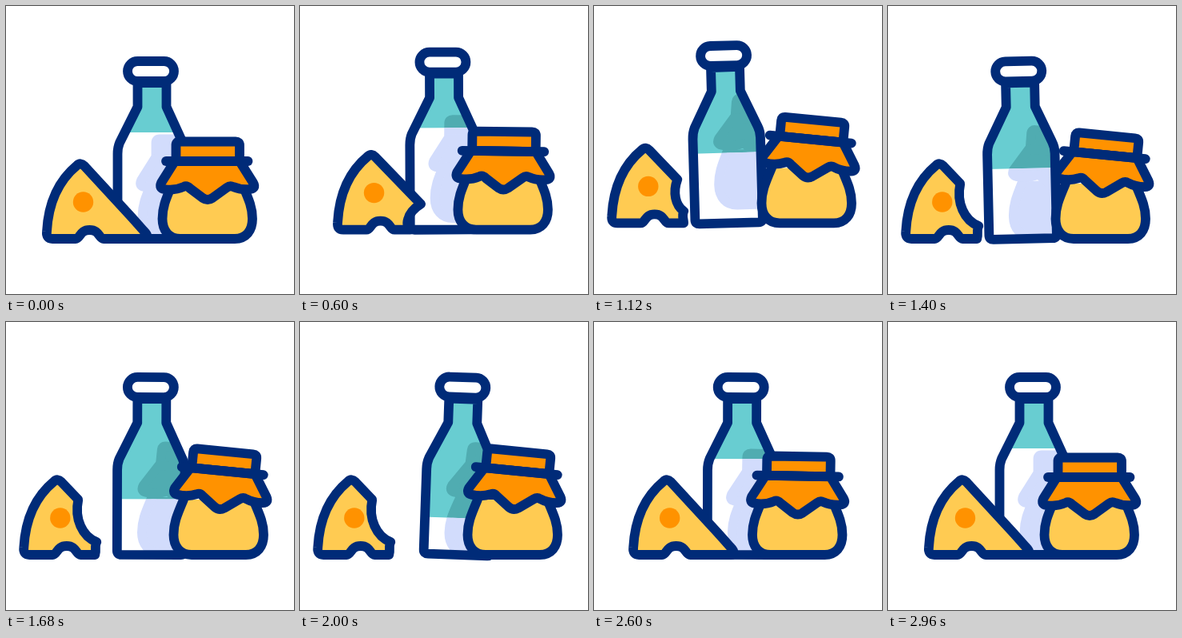
An HTML page with a canvas that plays this animation: 360 by 360 pixels, repeating every 3 s.

```html
<!DOCTYPE html>
<html lang="en">
<head>
<meta charset="utf-8">
<title>Milk, cheese and honey</title>
<style>
  html, body { margin: 0; width: 100%; height: 100%; overflow: hidden; background: #fff; }
  canvas { display: block; width: 360px; height: 360px; }
</style>
</head>
<body>
<canvas id="stage" width="360" height="360"></canvas>
<script>
const ctx = document.getElementById('stage').getContext('2d');
const LOOP = 3000, STEP = 40;
const INK = '#002b78', YELLOW = '#ffcb52', ORANGE = '#ff9200';
const TEAL = '#68cdd1', TEAL_SHADE = '#50acb1', MILK_SHADE = '#d2dcfc';

const bottle = new Path2D('M164.500 96V126L142 171Q139.500 177 139.500 185V286Q139.500 291 145 291H219Q224 291 224 286V185Q224 177 221 171L200.500 126V96Z');
const bottleCap = new Path2D('M164.500 69H197.500A12.500 12.500 0 0 1 197.500 94H164.500A12.500 12.500 0 0 1 164.500 69Z');
const jarBody = new Path2D('M208 222C199 243 195.500 252 195.500 266C195.500 281 204 291 218 291H286C300 291 308 281 308 266C308 252 304 243 295 222');
const jarCloth = new Path2D('M211 194L194 221Q191 228 198 229Q211 231 222 226Q226 224 230 228L246 240Q252 244 258 240L276 227Q280 224 284 226Q293 230 305 229Q313 228 309 221L292 194Z');
const jarLid = new Path2D('M212.500 194V174Q212.500 169.500 217 169.500H287Q292 169.500 292 174V194Z');
const jarRing = new Path2D('M200 194H302.500');

// Right side of the cheese: a start point and two cubic curves.
const whole = [173, 291, 178, 291, 177, 286, 173, 282, 165, 273, 158, 265, 151, 257.5];
const nibbled = [142, 291, 139, 289, 137, 284, 139, 278, 141, 270, 147, 264, 155, 259];
const bitten = [140, 291, 142, 285, 139, 280, 142, 275, 124, 268, 114, 246, 119, 222];

const progress = (t, from, to) => Math.min(1, Math.max(0, (t - from) / (to - from)));
const smooth = (t, from, to) => (1 - Math.cos(Math.PI * progress(t, from, to))) / 2;
const mix = (a, b, k) => a + (b - a) * k;
const mixAll = (a, b, k) => a.map((v, i) => mix(v, b[i], k));

function shape(path, fill, ink = INK) {
  if (fill) {
    ctx.fillStyle = fill;
    ctx.fill(path);
  }
  ctx.strokeStyle = ink;
  ctx.stroke(path);
}

function group(x, y, draw) {
  ctx.save();
  ctx.translate(x, y);
  draw();
  ctx.restore();
}

function rotateAbout(x, y, degrees) {
  ctx.translate(x, y);
  ctx.rotate(degrees * Math.PI / 180);
  ctx.translate(-x, -y);
}

// With a single colour the jar becomes its own shadow.
function drawJar(tip, colour) {
  shape(jarBody, colour || YELLOW, colour);
  group(tip, -8 * tip, () => {
    rotateAbout(252, 240, 5.6 * tip);
    shape(jarLid, colour || ORANGE, colour);
    shape(jarCloth, colour || ORANGE, colour);
    if (!colour) shape(jarRing);
  });
}

function drawBottle(tilt, level, lift, tip) {
  rotateAbout(182, 291, tilt);
  ctx.fillStyle = '#fff';
  ctx.fill(bottle);
  ctx.save();
  ctx.clip(bottle);
  ctx.fillStyle = TEAL;
  ctx.fillRect(100, 0, 160, level);
  for (const [top, height, colour] of [[0, level, TEAL_SHADE], [level, 360, MILK_SHADE]]) {
    ctx.save();
    ctx.beginPath();
    ctx.rect(100, top, 160, height);
    ctx.clip();
    group(-25, -3 - lift, () => drawJar(tip, colour));
    ctx.restore();
  }
  ctx.restore();
  shape(bottle);
  shape(bottleCap, '#fff');
}

function drawCheese(edge) {
  const curve = `L${edge.slice(0, 2)}C${edge.slice(2, 8)}C${edge.slice(8)}`;
  shape(new Path2D(`M89 199C67 217 53 245 51 282Q50 291 58 291H87C93 291 92 280 104.5 280S116 291 122 291${curve}L98 200Q93 195 89 199Z`), YELLOW);
  ctx.fillStyle = ORANGE;
  ctx.beginPath();
  ctx.arc(96.500, 245, 12.700, 0, 7);
  ctx.fill();
}

function draw(t) {
  const spread = smooth(t, 455, 1055);
  const lift = 33 * (smooth(t, 400, 900) - smooth(t, 900, 1400));
  const push = smooth(t, 500, 920);
  const swing = smooth(t, 1440, 1960);
  const home = 1 - smooth(t, 2130, 2760);
  const upright = 1 - smooth(t, 2060, 2700);
  const jarOut = spread * (1 - smooth(t, 2180, 2760));
  const cheeseOut = spread * (1 - progress(t, 2060, 2960)) ** 3;
  const bottleX = mix(-13 * push, 15, swing) * home;
  const lean = mix(-1.7 * push + 0.4 * smooth(t, 1000, 1400), 2, swing) * upright;
  const level = 158 + (45 * smooth(t, 480, 1000) + 42 * swing) * home;

  let edge = mixAll(whole, nibbled, smooth(t, 440, 600));
  edge = mixAll(edge, bitten, smooth(t, 960, 1240));
  edge = mixAll(edge, whole, smooth(t, 2040, 2280));

  ctx.fillStyle = '#fff';
  ctx.fillRect(0, 0, 360, 360);
  ctx.lineWidth = 11.8;
  ctx.lineCap = ctx.lineJoin = 'round';
  group(bottleX, -lift, () => drawBottle(lean, level, lift, jarOut));
  group(14 * jarOut, -lift, () => drawJar(jarOut));
  group(-28.7 * cheeseOut, -lift, () => drawCheese(edge));
}

function tick() {
  const t = performance.now() % LOOP;
  draw(Math.floor(t / STEP) * STEP);
  requestAnimationFrame(tick);
}
tick();
</script>
</body>
</html>
```
